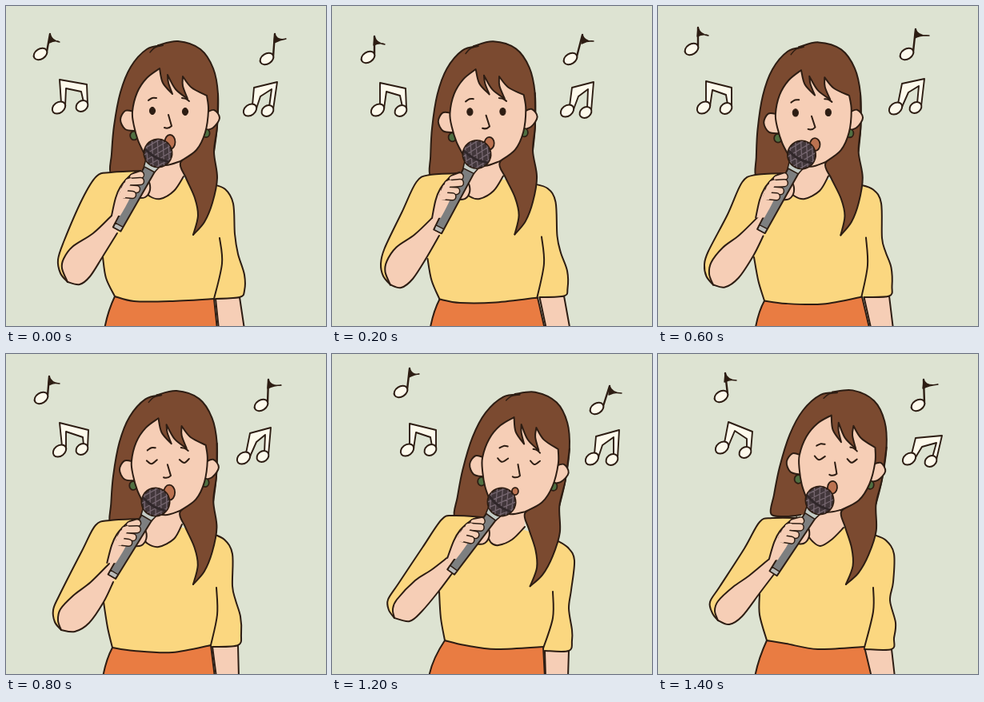
Recreate the animation shown at these times as an HTML page. Size 400 px wide and 400 px high, loop 1600 ms.

```html
<!DOCTYPE html>
<html lang="en">
<head>
<meta charset="utf-8">
<title>Singer</title>
<style>
html, body { margin: 0; width: 100%; height: 100%; overflow: hidden; background: #dde3d2; }
svg { display: block; width: 100%; height: 100%; fill: none; stroke-linecap: round; stroke-linejoin: round; }
</style>
</head>
<body>
<svg id="stage" viewBox="0 0 400 400">
  <defs><clipPath id="ball"><circle r="17"/></clipPath></defs>
</svg>
<script>
const INK = '#2d1d13', SKIN = '#f6ceb6', HAIR = '#7b4a30', SHIRT = '#fbd780',
      SKIRT = '#e97c42', CREAM = '#fdfaec';
const STEP = 200;

// Body poses. head: dx, dy, turn; mic: x, y, turn; mouth: x, y, rx, ry; hem: x at the bottom edge.
const open = {
  head: [0, 0, 0], mic: [190, 184, 0], mouth: [205, 170, 6.5, 9],
  sleeve: [168,206, 131,208, 113,213, 95,242, 72,295, 65,317, 68,334, 77,345],
  arm: [77,345, 92,348, 105,338, 121,313, 139,284],
  top: [132,262, 109,284, 83,301, 72,316, 70,328, 77,345],
  side: [121,314, 125,340, 136,363],
  waist: [136,363, 160,369, 205,369, 260,366],
  right: [256,222, 274,229, 284,247, 286,285, 290,310, 298,336, 298,356, 292,364, 262,366],
  inner: [267,290, 270,322, 260,366],
  neck: [170,228, 180,238, 193,241, 210,231, 222,213],
  hem: [124, 264, 266, 298]
};
const left = {
  head: [-20, 1.5, -3.7], mic: [172, 187, -3], mouth: [207, 172, 5.5, 6.5],
  sleeve: [152,212, 114,214, 98,227, 79,275, 59,312, 57,328, 60,341, 69,352],
  arm: [69,352, 81,356, 97,344, 116,315, 129,290],
  top: [124,262, 98,287, 78,302, 65,322, 63,337, 69,352],
  side: [118,318, 124,346, 133,370],
  waist: [133,370, 160,373, 205,372, 254,363],
  right: [246,222, 265,227, 275,243, 277,290, 282,307, 290,326, 291,350, 288,361, 257,362],
  inner: [257,287, 260,322, 253,362],
  neck: [156,228, 164,238, 176,241, 194,231, 206,212],
  hem: [123, 268, 270, 297]
};
const middle = {
  head: [-1, 2.2, -.4], mic: [187, 185, 2], mouth: [205, 171, 7, 9.5],
  sleeve: [166,206, 130,208, 112,214, 95,246, 66,303, 59,320, 61,335, 69,345],
  arm: [69,345, 86,347, 104,336, 122,310, 134,285],
  top: [129,262, 106,285, 84,302, 68,319, 65,333, 69,345],
  side: [122,310, 127,342, 133,367],
  waist: [133,367, 160,371, 208,373, 256,364],
  right: [256,224, 273,232, 283,250, 283,290, 287,308, 293,328, 294,350, 290,364, 258,366],
  inner: [263,292, 264,326, 256,364],
  neck: [168,226, 177,237, 191,241, 210,231, 220,213],
  hem: [122, 261, 263, 291]
};
const near = {
  head: [16.5, -1, 6.5], mic: [202, 183, 4], mouth: [203.5, 167.5, 6, 8],
  sleeve: [182,205, 143,205, 127,210, 108,243, 77,291, 65,310, 68,324, 75,333],
  arm: [75,333, 89,338, 105,328, 127,299, 146,274],
  top: [138,257, 114,277, 94,291, 75,309, 71,321, 75,333],
  side: [127,300, 127,326, 136,358],
  waist: [136,358, 160,362, 200,369, 258,366],
  right: [270,226, 285,233, 295,250, 294,285, 290,308, 297,336, 295,355, 292,369, 258,369],
  inner: [269,292, 269,322, 258,367],
  neck: [184,222, 193,234, 203,240, 217,232, 232,217],
  hem: [122, 267, 266, 296]
};
const far = {
  head: [28, 1.5, 6], mic: [212, 185, 7.5], mouth: [203, 170, 4, 4.5],
  sleeve: [190,204, 152,202, 137,207, 113,242, 83,287, 70,307, 71,320, 78,330],
  arm: [78,330, 97,334, 112,322, 133,297, 151,273],
  top: [146,253, 124,270, 104,283, 81,307, 76,319, 78,330],
  side: [134,297, 136,330, 141,358],
  waist: [141,358, 166,364, 205,369, 264,366],
  right: [281,233, 295,242, 303,258, 299,295, 296,318, 300,345, 300,358, 296,371, 266,371],
  inner: [276,297, 276,330, 264,368],
  neck: [193,224, 199,236, 208,239, 225,232, 241,216],
  hem: [122, 266, 267, 295]
};

// Notes per step. Single: head, stem top, flag tip. Pair: two heads, beam ends.
const notes = [
  ['43,60 55,35 67,45', '326,66 336,35 350,41', '66,127 95,125 67,92 101,98', '305,130 327,131 310,102 339,95'],
  ['45,64 53,38 66,48', '298,66 313,36 327,44', '57,130 86,131 60,96 92,103', '294,131 317,133 300,102 327,95'],
  ['38,62 49,35 60,45', '297,71 312,42 327,50', '47,134 75,136 50,102 83,109', '291,133 313,134 297,103 325,97'],
  ['42,54 50,27 63,37', '311,60 322,29 339,37', '57,127 85,128 60,94 92,102', '297,128 322,127 305,97 333,91'],
  ['44,55 54,28 67,37', '319,64 328,32 344,39', '67,121 95,119 67,86 103,95', '297,130 321,128 305,99 331,92'],
  ['66,62 73,32 85,38', '322,68 333,37 350,44', '72,114 100,116 81,80 109,88', '315,137 340,138 323,108 355,104'],
  ['86,47 97,18 109,25', '331,68 347,40 362,49', '94,120 123,120 97,87 130,95', '325,131 350,132 330,103 359,95'],
  ['79,53 84,24 98,33', '325,64 332,32 350,38', '80,117 109,123 88,85 118,97', '314,131 341,134 322,105 355,102']
];

const nums = s => s.split(/[ ,]+/).map(Number);
const pairs = a => Array.from({ length: a.length / 2 }, (_, i) => [a[2 * i], a[2 * i + 1]]);
const flip = a => pairs(a).reverse().flat();
const mix = (a, b) => Object.fromEntries(
  Object.keys(a).map(k => [k, a[k].map((v, i) => (v + b[k][i]) / 2)]));

// Smooth curve through the points
function curve(list, start = 'M') {
  const p = pairs(typeof list === 'string' ? nums(list) : list);
  let d = start + p[0];
  for (let i = 0; i + 1 < p.length; i++) {
    const a = p[i - 1] || p[i], b = p[i], c = p[i + 1], e = p[i + 2] || c;
    const k = j => [b[j] + (c[j] - a[j]) / 6, c[j] - (e[j] - b[j]) / 6];
    const [x1, x2] = k(0), [y1, y2] = k(1);
    d += `C${[x1, y1, x2, y2, c[0], c[1]].map(v => v.toFixed(1))}`;
  }
  return d;
}
const join = (...parts) => parts.map((p, i) => curve(p, i ? 'L' : 'M')).join('');
const fill = (d, color) => `<path d="${d}Z" fill="${color}"/>`;
const line = (d, w = 2, color = INK) => `<path d="${d}" stroke="${color}" stroke-width="${w}"/>`;
const both = (d, color, w = 2) => `<path d="${d}Z" fill="${color}" stroke="${INK}" stroke-width="${w}"/>`;
const oval = (x, y, rx, ry, color, w = 2, turn = 0) =>
  `<ellipse cx="${x}" cy="${y}" rx="${rx}" ry="${ry}" fill="${color}" stroke="${INK}" stroke-width="${w}" transform="rotate(${turn} ${x} ${y})"/>`;
const group = (t, s) => `<g transform="${t}">${s}</g>`;

function hairBack() {
  const side = '168,206 150,210 131,209 132,185 135,150 143,108 156,76 176,54 196,49';
  const crown = '190,49 215,44 243,54 259,78 265,110 264,150 260,182';
  return fill(join(side, crown) + 'L200,200', HAIR) + line(curve(side)) + line(curve(crown))
    + line(curve('196,49 186,52 180,58'), 1.5);
}

function strand() {
  const outer = '265,110 264,150 260,182 264,215 258,246 248,270 234,286';
  const inner = '234,286 240,262 236,240 225,215 218,196 236,180 250,150';
  return fill(join(outer, inner), HAIR) + line(curve(outer)) + line(curve(inner));
}

function face(mouth, shut) {
  const skin = join('172,183 165,168 160,150 158,132 164,108 176,90 192,78',
    '192,78 196,96 208,110', '208,110 203,96 202,86', '202,86 212,104 227,116',
    '227,116 221,100 221,88', '221,88 232,102 251,112',
    '251,112 253,130 249,158 238,180 218,194', '218,194 200,199 184,194 172,183');
  const eyes = shut
    ? line(curve('177,131 183,135 190,130')) + line(curve('218,130 224,134 230,129'))
    : oval(183, 131, 3.6, 4.6, INK, 1) + oval(224, 132, 3.6, 4.6, INK, 1);
  return both(curve('160,132 149,131 143,142 149,154 162,156'), SKIN)
    + both(curve('249,134 260,130 267,140 259,152 247,156'), SKIN)
    + oval(160, 162, 4.8, 5.4, '#4f7042', 1.8) + oval(250, 159, 4.6, 5.2, '#4f7042', 1.8)
    + both(skin, SKIN) + eyes
    + line(curve('178,118 183,115 188,115')) + line(curve('220,115 225,116 229,119'))
    + line('M203,136L207,150Q203,154 198,152')
    + oval(...mouth, '#bb7250', 1.8);
}

function mic() {
  let mesh = '';
  for (let i = -24; i <= 24; i += 8) mesh += `M${i - 12},-20L${i + 12},20M${i + 12},-20L${i - 12},20`;
  const tool = both('M-7,21L7.5,21L5.5,108L-5.5,108', '#7d7f80')
    + both('M-5.5,102L5.5,102L5,108L-5,108', '#b9bab8', 1.4)
    + both('M-10,13L10,13L7.5,23L-7.5,23', '#c3cbc5', 1.6)
    + oval(0, 0, 17.5, 17.5, '#42373b')
    + `<g clip-path="url(#ball)">${line(mesh, 1.3, '#75666f')}${line('M-17,3Q0,9 17,3', 3, '#30272a')}</g>`;
  const fingers = [[159,214,168,211], [153,220,168,219], [149,228,163,229], [147,235,158,236]];
  return both(curve('168,216 178,219 180,230 174,239 162,240'), SKIN)
    + group('translate(190 184) rotate(28.4)', tool)
    + fill(curve('131,262 137,240 143,226 154,213 163,209 160,228 153,244 143,262'), SKIN)
    + line(curve('132,262 137,240 143,226 154,213 163,207'))
    + fingers.map(([a, b, c, d]) => {
        const f = `M${a},${b}L${c},${d}`;
        return line(f, 10.5) + line(f, 7.5, SKIN);
      }).join('')
    + fill(curve('140,240 145,226 153,216 158,217 153,228 149,240'), SKIN);
}

function body(p) {
  const [x0, x1, x2, x3] = p.hem;
  const end = a => a.slice(-2);
  const [cx, cy] = end(p.right), [mx, my] = p.mic;
  const cuff = p.right.slice(-4, -2);
  return both(`M${cx},${cy}L${cuff}L${x3},404L${x2},404`, SKIN)
    + both(`M${p.waist.slice(0, 2)}Q${x0 + 3},382 ${x0 - 1},404L${x1},404L${end(p.waist)}`, SKIRT)
    + fill(join(p.sleeve, flip(p.top), p.side, p.waist, flip(p.right)), SHIRT)
    + fill(curve(p.neck) + `L${mx + 28},${my + 6}L${mx - 12},${my + 10}`, SKIN)
    + ['sleeve', 'side', 'waist', 'right', 'inner', 'neck'].map(k => line(curve(p[k]))).join('')
    + fill(join(p.top, p.arm) + `L${mx - 36},${my + 50}`, SKIN)
    + line(curve(p.top)) + line(curve(p.arm));
}

function single(s) {
  const [x, y, tx, ty, fx, fy] = nums(s);
  return line(`M${x + 8},${y - 3}L${tx},${ty}`, 2.4)
    + both(`M${tx},${ty}Q${tx + 3},${ty + 9} ${fx},${fy}Q${tx + 7},${ty + 7} ${tx - 1},${ty + 11}`, INK, 1.4)
    + oval(x, y, 9, 6.4, CREAM, 2, -32);
}

function pair(s) {
  const [x, y, u, v, ax, ay, bx, by] = nums(s);
  const frame = `M${ax},${ay}L${bx},${by}L${u + 7},${v - 2}L${u + 2},${v - 5}L${bx - 7},${by + 9}`
    + `L${ax + 8},${ay + 11}L${x + 8},${y - 2}L${x + 3},${y - 6}`;
  return both(frame, CREAM, 1.9) + oval(x, y, 9, 6.6, CREAM, 2, -38) + oval(u, v, 8, 6.4, CREAM, 2, -38);
}

function scene(p, shut, [a, b, c, d]) {
  const [dx, dy, turn] = p.head, [mx, my, tilt] = p.mic;
  const head = s => group(`translate(${dx} ${dy}) rotate(${turn} 200 150)`, s);
  return single(a) + single(b) + pair(c) + pair(d)
    + head(hairBack()) + body(p) + head(strand() + face(p.mouth, shut))
    + group(`translate(${mx} ${my}) rotate(${tilt}) translate(-190 -184)`, mic());
}

const poses = [open, mix(open, left), left, mix(left, middle), middle, near, far, near];
const stage = document.getElementById('stage');
const steps = poses.map((p, i) => {
  const g = document.createElementNS('http://www.w3.org/2000/svg', 'g');
  g.innerHTML = scene(p, i > 3, notes[i]);
  return stage.appendChild(g);
});

const begin = performance.now();
function show(now) {
  const k = Math.floor(Math.max(0, now - begin) / STEP) % steps.length;
  steps.forEach((g, i) => { g.style.display = i === k ? '' : 'none'; });
  requestAnimationFrame(show);
}
show(begin);
</script>
</body>
</html>
```
